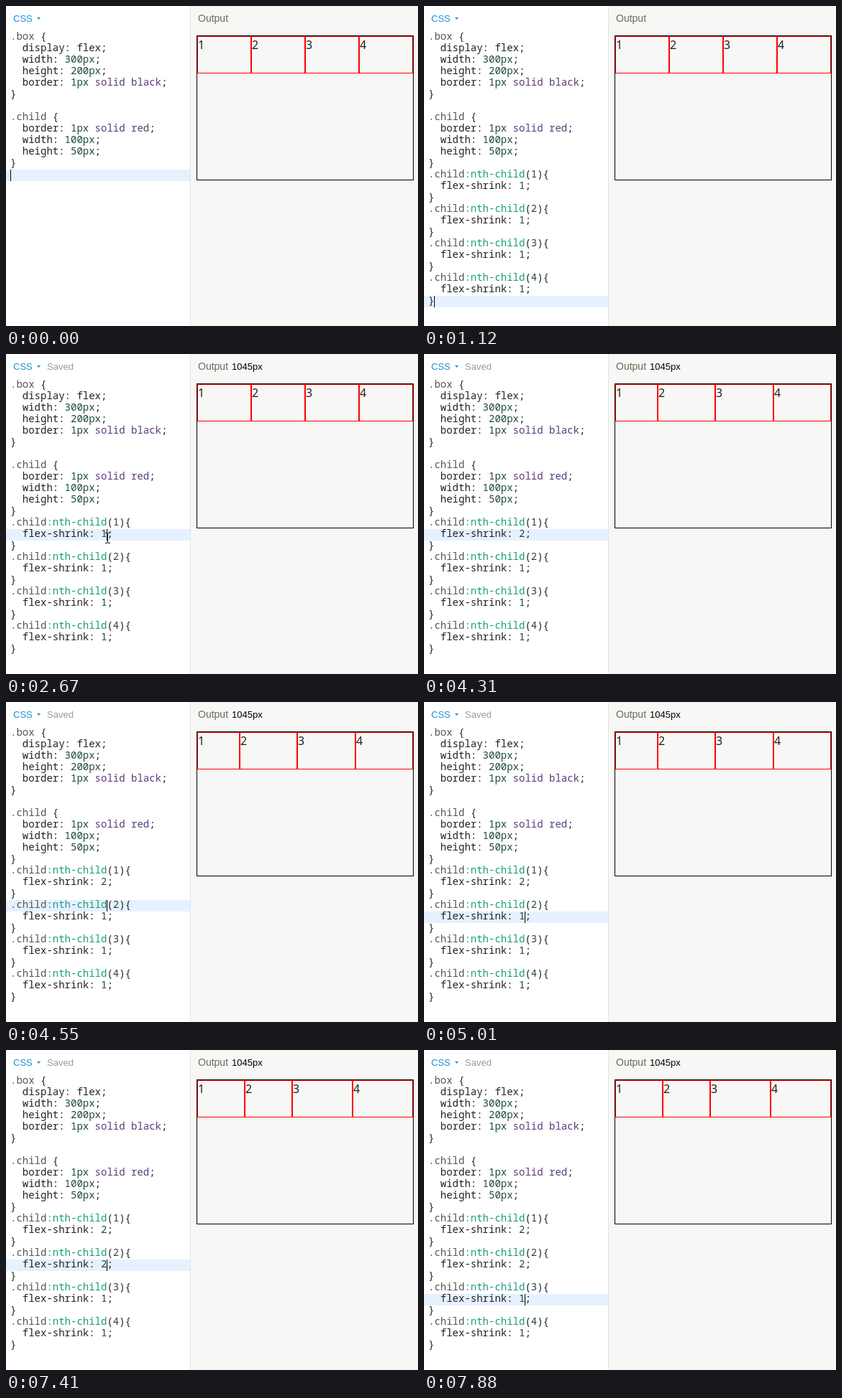
These frames come from a looping animation (573x446 px, 8000 ms). An HTML page with a canvas:

```html
<!DOCTYPE html>
<html lang="en">
<head>
<meta charset="utf-8">
<title>Flex shrink demo</title>
<style>
html, body { margin: 0; width: 100%; height: 100%; overflow: hidden; background: #fff; }
canvas { display: block; }
</style>
</head>
<body>
<canvas id="stage" width="573" height="446"></canvas>
<script>
const ctx = document.getElementById('stage').getContext('2d');
const LOOP = 8000, CHAR = 8.4, ROW = 16, LEFT = 6, TOP = 36;
const MONO = '14px "Noto Sans Mono", monospace';
const UI = '13px Arial, "Liberation Sans", sans-serif';
const COLORS = { plain: '#222', selector: '#555', pseudo: '#1a9d7d', number: '#1f4a3a', value: '#5a3a7a' };

const BASE = `.box {
  display: flex;
  width: 300px;
  height: 200px;
  border: 1px solid black;
}

.child {
  border: 1px solid red;
  width: 100px;
  height: 50px;
}`.split('\n');

// Key presses and clicks, in ms; everything else follows from them
const PASTE = 1120, CLICK = 2220;
const edits = [{ erase: 3070, type: 3380 }, { erase: 5700, type: 6330 }];
const downs = [4380, 4550, 5010, 7560, 7720, 7880];
const changes = [PASTE, ...edits.flatMap(e => [e.erase, e.type])];
const inputs = [-460, CLICK, ...changes, ...downs];
const BLINK = 530, RENDER = 240, SAVE = 900;

const latest = (times, t) => Math.max(...times.filter(time => time <= t));

function shrinkText(i, t) {
  const e = edits[i];
  return !e || t < e.erase ? '1' : t < e.type ? '' : '2';
}

function caretRow(t) {
  if (t < PASTE) return 12;
  return t < CLICK ? 23 : 13 + downs.filter(time => time <= t).length;
}

function rect(x, y, w, h, color) {
  ctx.fillStyle = color;
  ctx.fillRect(x, y, w, h);
}

function frame(x, y, w, h, color) {
  ctx.strokeStyle = color;
  ctx.strokeRect(x + 0.5, y + 0.5, w - 1, h - 1);
}

function text(str, x, y, font, color) {
  ctx.font = font;
  ctx.fillStyle = color;
  ctx.fillText(str, x, y);
}

function polygon(points, color) {
  ctx.beginPath();
  points.forEach(([x, y]) => ctx.lineTo(x, y));
  ctx.closePath();
  ctx.fillStyle = color;
  ctx.fill();
}

function kind(token) {
  if (token[0] === '.') return 'selector';
  if (token === ':nth-child') return 'pseudo';
  if (/^\d/.test(token)) return 'number';
  return /^(solid|black|red)$/.test(token) ? 'value' : 'plain';
}

function codeLine(line, row) {
  for (const m of line.matchAll(/\.\w+|:nth-child|\d\w*|[a-z-]+|[^\s\w]/g))
    text(m[0], LEFT + m.index * CHAR, TOP + 11 + row * ROW, MONO, COLORS[kind(m[0])]);
}

function editor(t) {
  const lines = BASE.slice();
  for (let i = 0; i < 4 && t >= PASTE; i++)
    lines.push(`.child:nth-child(${i + 1}){`, `  flex-shrink: ${shrinkText(i, t)};`, '}');

  const row = caretRow(t), line = lines[row] || '';
  const col = line.endsWith(';') ? line.length - 1 : Math.min(16, line.length);
  rect(0, TOP + row * ROW, 256, ROW, '#e6f1ff');
  lines.forEach(codeLine);
  if ((t - latest(inputs, t)) % (2 * BLINK) < BLINK)
    rect(Math.floor(LEFT + col * CHAR), TOP + row * ROW, 1, ROW, '#000');

  text('CSS', 10, 22, UI, '#1c90d4');
  polygon([[43, 16], [48, 16], [45.5, 19]], '#1c90d4');
  if (t >= PASTE && t - latest(changes, t) >= SAVE) text('Saved', 57, 22, UI, '#999');
}

function output(t) {
  rect(256, 0, 317, 446, '#f7f7f5');
  rect(256, 0, 1, 446, '#e3e3e1');
  text('Output', 267, 22, UI.replace('13', '14'), '#6d675c');
  if (t >= PASTE + RENDER) text('1045px', 314, 22, UI, '#000');
  frame(265, 41, 302, 202, '#000');

  // Four 102px children share the 108px overflow by their shrink factors
  const factors = [0, 1, 2, 3].map(i => +shrinkText(i, t - RENDER) || 1);
  const total = factors.reduce((a, b) => a + b);
  let x = 266;
  factors.forEach((factor, i) => {
    const edge = Math.round(x);
    x += 102 - 108 * factor / total;
    frame(edge, 42, Math.round(x) - edge, 52, '#f00');
    text(i + 1, edge + 1, 60, '16px "Noto Sans", sans-serif', '#222');
  });
}

function glide(t, from, to, a, b) {
  const p = Math.min(1, Math.max(0, (t - from) / (to - from)));
  const k = p * p * (3 - 2 * p);
  return a.map((v, i) => Math.round(v + (b[i] - v) * k));
}

function pointer(t) {
  if (t < 1400 || t >= 4290) return;
  const [x, y] = t < 3900
    ? glide(t, 1820, CLICK, [137, 407], [141, 256])
    : glide(t, 3900, 4200, [141, 256], [496, 211]);
  if (x > 256) {
    polygon([[x, y], [x, y + 15], [x + 4, y + 12], [x + 10, y + 11]], '#000');
    return;
  }
  rect(x, y - 6, 1, 13, '#000');
  for (const end of [y - 7, y + 7]) {
    rect(x - 3, end, 3, 1, '#000');
    rect(x + 1, end, 3, 1, '#000');
  }
}

function draw(t) {
  rect(0, 0, 573, 446, '#fff');
  editor(t);
  output(t);
  pointer(t);
}

const start = performance.now();
(function loop() {
  draw((performance.now() - start) % LOOP);
  requestAnimationFrame(loop);
})();
</script>
</body>
</html>
```
